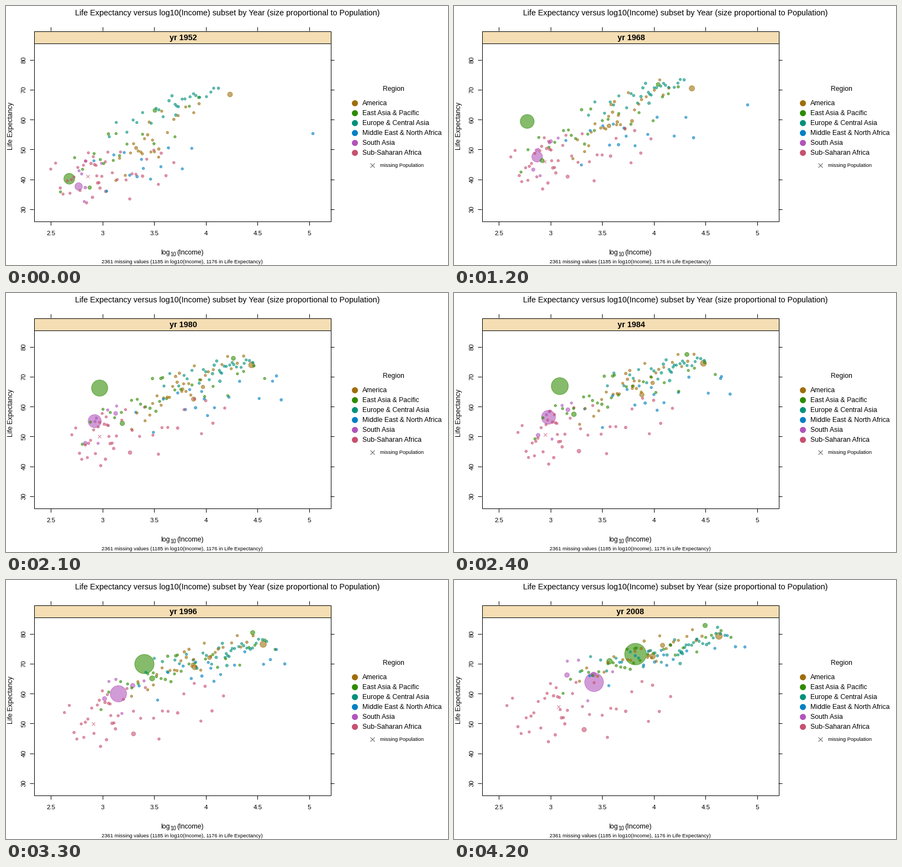
Write a matplotlib script that moves like this. It is 800 px wide and 470 px high and loops after 5.2 s.

```python
import matplotlib.pyplot as plt
import numpy as np
from matplotlib.animation import FuncAnimation
from matplotlib.colors import to_rgba
from matplotlib.patches import Rectangle

W, H, DPI = 800, 470, 100
PX = 72 / DPI
plt.rcParams["font.family"] = "Liberation Sans"

AMERICA, PACIFIC, EUROPE, MIDEAST, SOUTH, AFRICA = range(6)
REGIONS = ["America", "East Asia & Pacific", "Europe & Central Asia",
           "Middle East & North Africa", "South Asia", "Sub-Saharan Africa"]
COLORS = ["#9e6d0a", "#2d8b00", "#00907b", "#0080c4", "#b054bb", "#c75070"]

KEY_YEARS = [1952, 1960, 1968, 1980, 1988, 1996, 2008]
ERAS = [1952, 1980, 2008]

# Bubbles followed one by one: region, x path, y path, first and last radius.
TRACKS = [
    (PACIFIC, [114, 131, 132, 169, 213, 250, 328],
     [313, 360, 209, 172, 165, 152, 134], (9.8, 19.6)),
    (SOUTH, [131, 145, 150, 160, 181, 203, 253],
     [327, 301, 273, 232, 218, 206, 185], (6.8, 17)),
    (AMERICA, [405, 410, 430, 444, 458, 465, 479],
     [160, 152, 149, 130, 124, 116, 101], (4.4, 6.2)),
    (PACIFIC, [151, 159, 159, 210, 223, 264, 281],
     [329, 308, 280, 236, 203, 178, 147], (3.2, 5.1)),
    (PACIFIC, [269, 312, 369, 411, 431, 446, 454],
     [189, 163, 142, 118, 104, 95, 82], (3.5, 4)),
    (AMERICA, [235, 265, 280, 339, 340, 341, 359],
     [257, 236, 217, 192, 176, 158, 138], (2.9, 4.9)),
    (MIDEAST, [555, 552, 531, 489, 475, 478, 526],
     [231, 210, 179, 150, 159, 144, 121], (2.3, 2.3)),
    (AMERICA, [276, 356, 377], [259, 170, 118], (2.5, 3.9)),
    (SOUTH, [144, 198, 252], [281, 218, 171], (2.5, 4.5)),
    (SOUTH, [143, 143, 204], [329, 272, 172], (2.6, 4.2)),
    (AFRICA, [180, 224, 235], [336, 289, 271], (2.5, 4.1)),
]
MISSING = ([147, 146, 163, 168, 160, 157, 188], [308, 299, 281, 259, 254, 260, 229])

# Small dots per region and era: low end, middle and high end of the ridge
# as x, y pairs, then the spread around it and the number of dots.
CLOUDS = [
    [(195, 318, 262, 252, 360, 168, 25, 22), (222, 250, 318, 170, 431, 122, 16, 30),
     (220, 185, 350, 133, 461, 98, 14, 26)],
    [(93, 320, 194, 262, 368, 158, 23, 16), (130, 260, 278, 180, 470, 130, 21, 28),
     (190, 197, 325, 140, 503, 88, 13, 28)],
    [(180, 240, 306, 178, 394, 145, 11, 26), (280, 170, 386, 140, 447, 120, 11, 28),
     (218, 168, 408, 128, 491, 93, 13, 37)],
    [(154, 325, 245, 298, 360, 265, 24, 13), (228, 255, 354, 195, 516, 165, 20, 16),
     (238, 200, 375, 138, 526, 100, 13, 16)],
    [(125, 335, 140, 325, 181, 265, 22, 4), (157, 290, 165, 240, 209, 185, 24, 5),
     (176, 220, 240, 170, 299, 150, 35, 4)],
    [(76, 325, 164, 308, 305, 300, 25, 40), (115, 288, 186, 260, 398, 225, 26, 40),
     (90, 262, 192, 235, 394, 230, 29, 40)],
]
MAX_DOTS = 40
GOLDEN = (5 ** 0.5 - 1) / 2
rng = np.random.default_rng(7)
SPREAD = rng.normal(size=(len(CLOUDS), MAX_DOTS)).clip(-1.8, 1.8)
SMALL_RADII = 2.15 + 0.6 * rng.random(MAX_DOTS) ** 4


def cloud_at(region, year):
    """Dots keep their rank along the ridge while the ridge itself moves."""
    x0, y0, x1, y1, x2, y2, spread, count = (
        np.interp(year, ERAS, values) for values in zip(*CLOUDS[region]))
    n = round(count)
    s = 2 * ((np.arange(n) + 0.5) * GOLDEN % 1) - 1
    s = np.sign(s) * np.abs(s) ** 1.5
    x = np.interp(s, [-1, 0, 1], [x0, x1, x2])
    y = np.interp(s, [-1, 0, 1], [y0, y1, y2]) + spread * SPREAD[region, :n]
    return x, y, SMALL_RADII[:n], np.full(n, region)


def track_at(region, xs, ys, radii, year):
    years = ERAS if len(xs) == len(ERAS) else KEY_YEARS
    return (np.interp(year, years, xs), np.interp(year, years, ys),
            np.interp(year, [years[0], years[-1]], radii), region)


def bubbles_at(year):
    tracked = [track_at(*track, year) for track in TRACKS]
    clouds = [np.column_stack(cloud_at(region, year)) for region in range(len(CLOUDS))]
    rows = np.vstack([tracked, *clouds])
    return rows[np.argsort(-rows[:, 2], kind="stable")]


def area(radius):
    return (2 * PX * radius) ** 2


fig = plt.figure(figsize=(W / DPI, H / DPI), dpi=DPI, facecolor="white")
ax = fig.add_axes([0, 0, 1, 1])
ax.set_xlim(0, W)
ax.set_ylim(H, 0)
ax.axis("off")


def label(x, y, text, size, **options):
    options = {"ha": "center", "va": "baseline", **options}
    return ax.text(x, y, text, fontsize=size * PX, **options)


def line(xs, ys):
    ax.plot(xs, ys, color="black", lw=PX, solid_capstyle="butt")


def box(x, y, w, h, fill):
    ax.add_patch(Rectangle((x, y), w, h, fc=fill, ec="black", lw=PX))


label(400.5, 17, "Life Expectancy versus log10(Income) subset by Year "
      "(size proportional to Population)", 14.35)
box(50.5, 67.5, 537, 323, "none")
box(50.5, 45.5, 537, 22, "#f5deb3")
strip = label(321, 62, "", 14.4, weight="bold")

for i in range(6):
    x, y = 81 + 93.6 * i, 97.5 + 54.3 * i
    line([x, x], [391, 398])
    line([x, x], [38, 45])
    line([43, 50], [y, y])
    line([587, 594], [y, y])
    label(x, 416, f"{2.5 + i / 2:g}", 11.5)
    label(32.5, y, str(80 - 10 * i), 11.5, rotation=90, va="center")

label(9.5, 218, "Life Expectancy", 12.3, rotation=90, va="center")
label(280, 451, "log", 12.2, ha="left")
label(297.5, 454, "10", 9.6, ha="left")
label(309, 451, "(Income)", 12.2, ha="left")
label(319, 467, "2361 missing values (1185 in log10(Income), "
      "1176 in Life Expectancy)", 9.4)

label(701, 154, "Region", 12.2)
for i, (name, color) in enumerate(zip(REGIONS, COLORS)):
    ax.scatter(630.5, 175.5 + 18 * i, s=area(5.5), c=color, linewidths=0)
    label(645, 180 + 18 * i, name, 12.2, ha="left")
ax.scatter(662.5, 288.5, s=area(4), marker="x", c="#777777", linewidths=1.2 * PX)
label(677, 292, "missing Population", 9.4, ha="left")

cross = ax.scatter(0, 0, s=area(3), marker="x", c=COLORS[AFRICA], alpha=0.75,
                   linewidths=PX, zorder=2)
dots = ax.scatter([], [], linewidths=PX, zorder=3)
FILLS = np.array([to_rgba(c, 0.58) for c in COLORS])
EDGES = np.array([to_rgba(c, 0.62) for c in COLORS])


def update(frame):
    year = 1952 + 4 * min(frame // 3, 14)
    strip.set_text(f"yr {year}")
    strip.set_x(321 if year < 2000 else 319)
    rows = bubbles_at(year)
    region = rows[:, 3].astype(int)
    dots.set_offsets(rows[:, :2] + 0.5)
    dots.set_sizes(area(rows[:, 2]))
    dots.set_facecolors(FILLS[region])
    dots.set_edgecolors(EDGES[region])
    cross.set_offsets([[np.interp(year, KEY_YEARS, v) + 0.5 for v in MISSING]])
    return dots, cross, strip


anim = FuncAnimation(fig, update, frames=52, interval=100, repeat=True,
                     repeat_delay=0, blit=False)
plt.show()
```
